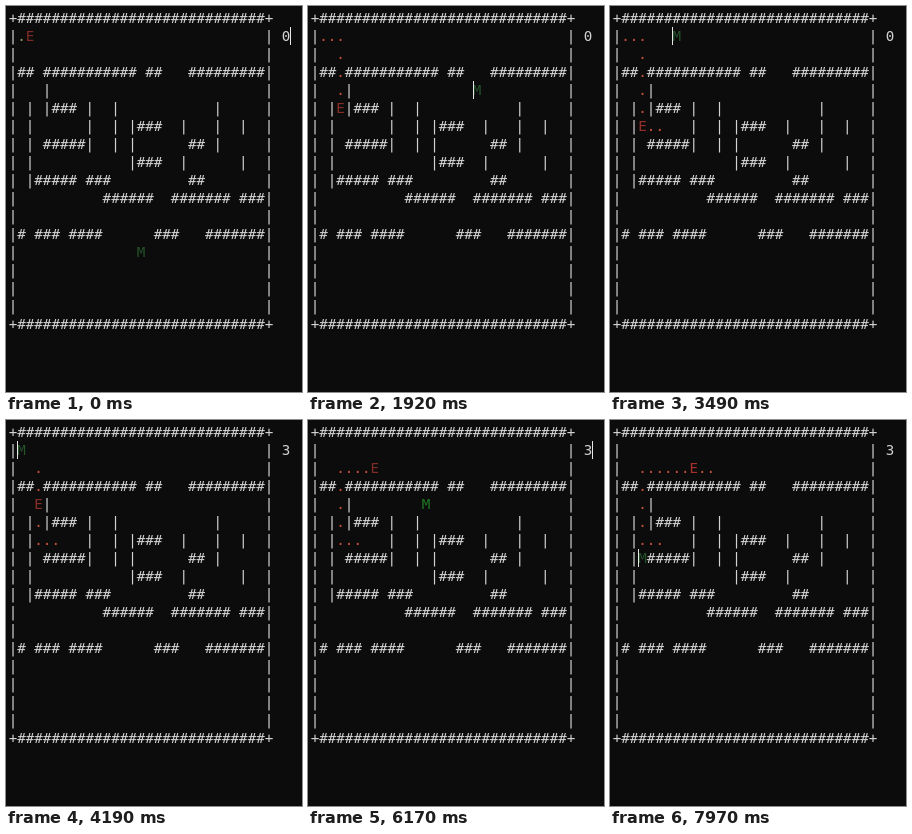
An HTML page with a canvas that plays this animation: 296x386 px, repeating every 8 s.

```html
<!DOCTYPE html>
<html lang="en">
<head>
<meta charset="utf-8">
<title>Terminal maze</title>
<style>
  html, body { margin: 0; width: 100%; height: 100%; overflow: hidden; background: #0c0c0c; }
  canvas { display: block; }
</style>
</head>
<body>
<canvas id="stage" width="296" height="386"></canvas>
<script>
const LOOP = 8000;
const CELL_W = 8.533, CELL_H = 18;
const HUNTER_STEP = 325 / 3, RUNNER_STEP = 325;

const border = '+' + '#'.repeat(29) + '+';
const rooms = [
  '',
  '',
  '## ########### ##   #########',
  '   |',
  ' | |### |  |           |',
  ' |      |  | |###  |   |  |',
  ' | #####|  | |      ## |',
  ' |           |###  |      |',
  ' |##### ###         ##',
  '          ######  ####### ###',
  '',
  '# ### ####      ###   #######',
  '', '', '', ''
];
const maze = [border, ...rooms.map(row => '|' + row.padEnd(29) + '|'), border];

// Expands corner points into the list of cells walked through.
function walk(corners) {
  const cells = [corners[0]];
  for (const [toCol, toRow] of corners.slice(1)) {
    let [col, row] = cells[cells.length - 1];
    while (col !== toCol || row !== toRow) {
      col += Math.sign(toCol - col);
      row += Math.sign(toRow - row);
      cells.push([col, row]);
    }
  }
  return cells;
}

const runnerPath = walk([[1, 1], [3, 1], [3, 6], [5, 6], [3, 6], [3, 2], [11, 2], [9, 2]]);
const hunterPath = walk([
  [15, 13], [13, 13], [16, 13], [16, 11], [17, 11], [17, 9], [19, 9], [19, 1],
  [1, 1], [15, 1], [15, 4], [13, 4], [13, 8], [3, 8], [3, 7]
]);

const ctx = document.getElementById('stage').getContext('2d');
ctx.font = '14.2px "DejaVu Sans Mono", "Noto Sans Mono", monospace';
ctx.textAlign = 'center';

const clamp = (value, low, high) => Math.min(high, Math.max(low, value));
const key = cell => cell.join();

function put(char, [col, row], color) {
  ctx.fillStyle = color;
  ctx.fillText(char, 7 + col * CELL_W, 17 + row * CELL_H);
}

function putCursor([col, row]) {
  ctx.fillStyle = '#e6e6e6';
  ctx.fillRect(Math.round(7 + (col - 0.5) * CELL_W), 3 + row * CELL_H, 1, CELL_H);
}

function draw(t) {
  const hunterClock = t + 5;
  const hunterIndex = clamp(Math.floor(hunterClock / HUNTER_STEP), 0, hunterPath.length - 1);
  const runnerClock = t - 30 + RUNNER_STEP;
  const runnerIndex = clamp(Math.floor(runnerClock / RUNNER_STEP), 1, runnerPath.length - 1);
  const hunter = hunterPath[hunterIndex];
  const runner = runnerPath[runnerIndex];

  ctx.fillStyle = '#0c0c0c';
  ctx.fillRect(0, 0, 296, 386);
  maze.forEach((line, row) => [...line].forEach((char, col) => {
    if (char !== ' ') put(char, [col, row], '#d2d2d2');
  }));

  const trail = new Set(runnerPath.slice(0, runnerIndex).map(key));
  trail.delete(key(runner));
  let score = 0;
  for (const cell of hunterPath.slice(0, hunterIndex + 1)) {
    if (trail.delete(key(cell))) score++;
  }
  const newest = key(runnerPath[runnerIndex - 1]);
  for (const dot of trail) {
    const fresh = dot === newest && runnerIndex < 5;
    put('.', dot.split(',').map(Number), fresh ? '#8f9a58' : '#c4553a');
  }

  const age = (runnerClock % RUNNER_STEP) / RUNNER_STEP;
  put('E', runner, `rgb(${200 - 80 * age}, ${52 - 10 * age}, 40)`);

  const printingScore = hunterClock % HUNTER_STEP < 25;
  put('M', hunter, printingScore && hunterIndex ? '#1c7a22' : '#24532a');
  put(score, [32, 1], '#d2d2d2');
  putCursor(printingScore ? [33, 1] : hunter);
}

function tick() {
  draw(performance.now() % LOOP);
  requestAnimationFrame(tick);
}
tick();
</script>
</body>
</html>
```
